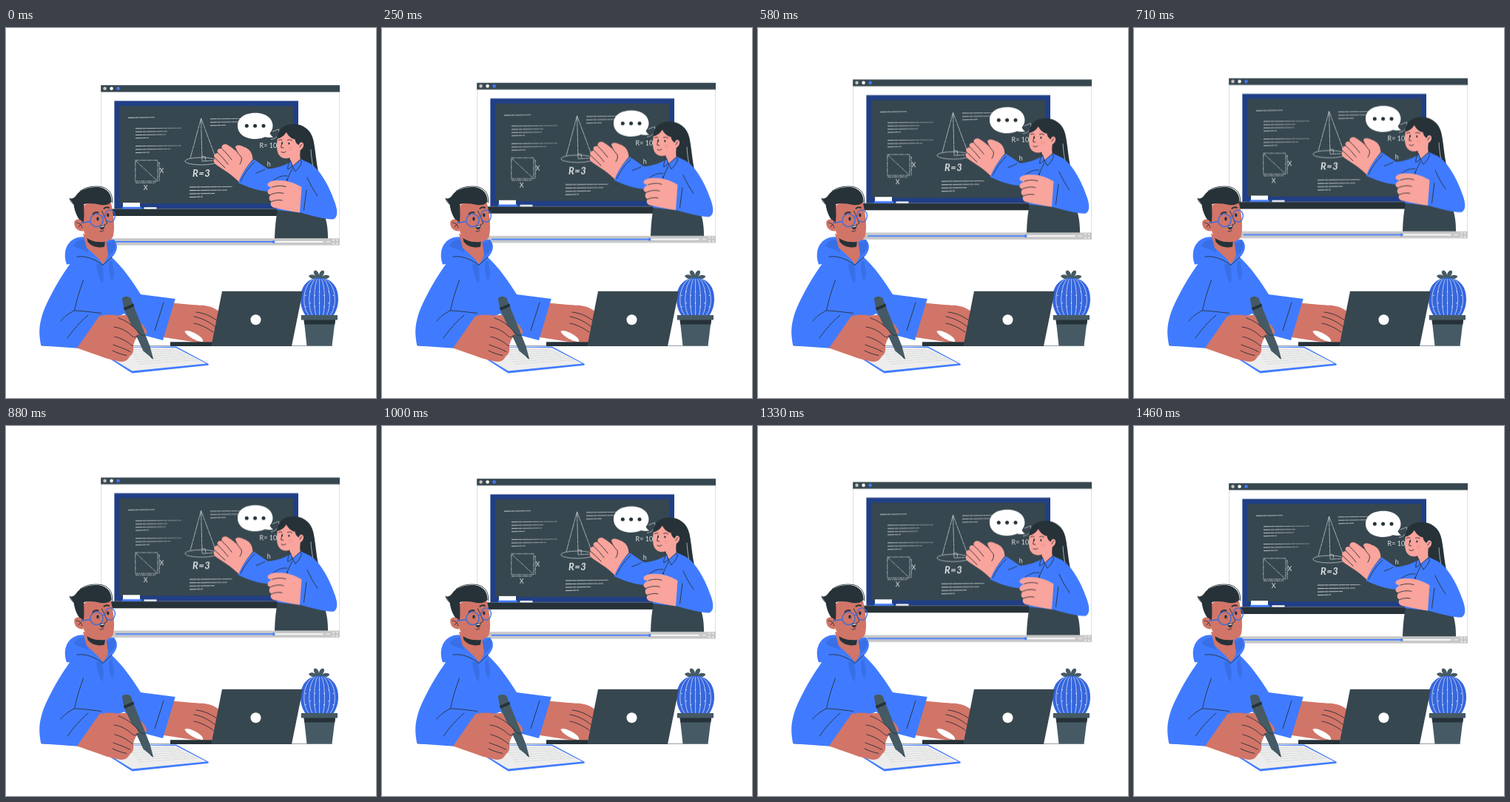
Animation of 500x500 px, one loop 1500 ms. Source, as an HTML page:

```html
<!DOCTYPE html>
<html lang="en">
<head>
<meta charset="utf-8">
<title>Online lesson</title>
<style>
html, body { margin: 0; width: 100%; height: 100%; overflow: hidden; background: #fff; }
svg { display: block; width: 100%; height: 100%; }
.blue { fill: #407bff; }
.navy { fill: #203f86; }
.shade { fill: #396fe6; }
.slate { fill: #37474f; }
.steel { fill: #455a64; }
.ink { fill: #263238; }
.pale { fill: #f9a49c; }
.tan { fill: #d17568; }
.grey { fill: #c7c7c7; }
.white { fill: #fff; }
.line { fill: none; stroke: #263238; stroke-width: .9; stroke-linecap: round; stroke-linejoin: round; }
.chalk { fill: none; stroke: #cbd1d4; stroke-width: .75; }
.rough { stroke-dasharray: 9 .5 5 .7 13 .4; }
.hand { fill: #dfe3e5; font: 9px Lato, "Open Sans", sans-serif; }
.big { font-size: 13px; font-weight: 700; font-style: italic; letter-spacing: .5px; }
</style>
</head>
<body>
<svg viewBox="0 0 500 500" xmlns="http://www.w3.org/2000/svg">
<defs>
  <linearGradient id="fade" gradientUnits="userSpaceOnUse" x1="165" x2="330" y1="0" y2="0">
    <stop offset="0" stop-color="#dfe3e5"/><stop offset=".42" stop-color="#7f8a8f"/>
    <stop offset=".5" stop-color="#dfe3e5"/><stop offset="1" stop-color="#9aa3a7"/>
  </linearGradient>
</defs>
<g id="screen">
  <!-- player -->
  <path d="M128.6 80V293H450.6V80Z" fill="#fff" stroke="#d0d0d0" stroke-width=".7"/>
  <path class="slate" d="M128.2 77.2H451V86.4H128.2Z"/>
  <circle class="grey" cx="133.6" cy="81.8" r="2.3"/>
  <circle class="white" cx="142.6" cy="81.8" r="2.3"/>
  <circle class="blue" cx="151.6" cy="81.8" r="2.3"/>
  <path class="grey" d="M128.2 284.2H451V293.5H128.2Z"/>
  <path class="white" d="M148 288H428.5V289.8H148Z"/>
  <path class="blue" d="M148 288H362V289.8H148Z"/>
  <circle class="blue" cx="361.6" cy="288.9" r="1.9"/>
  <path d="M432.5 288.9H438M442 288V286.3H444M446 286.3H447.8V288M447.8 290V291.7H446M444 291.7H442V290" fill="none" stroke="#fff" stroke-width=".9"/>

  <!-- board -->
  <path class="navy" d="M146.4 98.4H395V244.6H146.4Z"/>
  <path class="slate" d="M153.2 105.2H388.2V237.2H153.2Z"/>
  <path class="ink" d="M140 244.5H368V254H140Z"/>
  <path class="white" d="M158 236H181V242H158ZM186.5 242.2H203.5V244.4H186.5Z"/>
  <path class="blue" d="M157 241.8H183V244.4H157Z"/>
  <g id="notes" stroke="url(#fade)" stroke-width=".9"></g>
  <path class="chalk" d="M174.8 178.8H205V207H174.8ZM175 179.2L204.8 206.8M205.5 182H207.3V207M175 209.2H202" stroke-dasharray="5 .9 2 .6"/>
  <path class="chalk rough" d="M263.6 122L249 176M263.6 122L284 177M263.6 122L265 180M265 173.5L269.5 174V179.5M265 180L285 179"/>
  <ellipse class="chalk" cx="264" cy="180" rx="22" ry="5" stroke-width="1"/>
  <path class="chalk" d="M358 150.5C365 150 369 145 368.8 137M360 140L368.8 136.5" stroke-width=".6"/>
  <text class="hand big" x="252" y="201">R=3</text>
  <text class="hand" x="342.5" y="161.8" font-style="italic">R= 10</text>
  <text class="hand" x="352.8" y="187.3">h</text>
  <text class="hand" x="207.5" y="196.2">X</text>
  <text class="hand" x="185.8" y="219.2">X</text>

  <!-- speech bubble -->
  <path class="white" d="M313 132C313 121 323 114.7 337 114.7 351 114.7 360.5 122 360.5 132 360.5 136 359 139.5 356.5 142.3 357.5 144.5 359 146.3 361.3 147.6 357 148.5 353 148 349.8 147.3 346 149.2 341.5 150 337 150 323 150 313 143 313 132Z"/>
  <circle class="ink" cx="325.3" cy="132.2" r="2.5"/>
  <circle class="ink" cx="336.6" cy="132.2" r="2.5"/>
  <circle class="ink" cx="348" cy="132.2" r="2.5"/>

  <!-- teacher -->
  <path class="ink" d="M366.5 146C369 135 378 129.6 389 129.8 402 130 412.5 138 415.5 152 419 168 419 188 426 209L404 203 384 181Z"/>
  <path d="M412 164C413 180 415 191 420.5 204" fill="none" stroke="#fff" stroke-width=".6"/>
  <path class="slate" d="M368 240L407 240 430 252C434 262 435 273 435 284.2H363C363.3 270 365 254 368 240Z"/>
  <path class="blue" d="M385 180.5C376 186 366 189.5 354 190.5L335 177.5C326 186 318.5 197 313.5 209 328 215.5 344 222 361 221L366 246 398 249.5C421 256 436 259.5 443 258.2 449 255 448 246 444.5 236 437 214 425 192 411 183L398 177Z"/>
  <path class="pale" d="M383 172L398 163C397 171 397 176 398.5 178.5L391 190 384 180Z"/>
  <path class="pale" d="M368 144C365.5 154 365 165 368.5 171 372 177 381 178 388 173.5 392 171 395 168 396 165.5 400 165 403 160 402 156.5 400.5 153.3 397 154 394.5 157.5L392 149C386 149 381 146 379 141Z"/>
  <path class="ink" d="M366.3 149.5C366 142 371 135 379 133L390 138C399 143 399 154 395.5 158 391.5 156 391 152.5 390.5 150.5 385 149.5 380.5 145 379.5 139.5 376 146 371 149 366.3 149.5Z"/>
  <path class="line" d="M373.5 154C372.5 157 371.5 160 371.8 161.5L374.8 162M372 167.5C374 168.8 376.5 168.5 378 167.2M380.5 151.3Q383.5 149.6 386.5 152M368.5 151.6Q370.5 150 373 151.2M397 161Q398 157.5 400 157.2"/>
  <ellipse class="ink" cx="382.4" cy="156" rx="1.1" ry="1.6"/>
  <ellipse class="ink" cx="373" cy="155.8" rx="1" ry="1.5"/>
  <ellipse cx="384.5" cy="163" rx="3" ry="2.4" fill="#f28f8f" opacity=".4"/>
  <path class="line" style="fill:#407bff" d="M384.3 179.2C381.5 183.5 380.5 187 380.8 191L387.3 187 391 194C395 190 398 186 399.5 181.5L397.8 177.5 387.3 187Z"/>
  <path class="line" d="M387 190C383 198 380 204 379 209M317 207C322 197 328 188 336 181M350 191C346 193 342 195 338 196M407 202C411 211 416 220 421 227M402.5 246L406 219M361 206C368 201 374 199 380 200"/>
  <circle class="ink" cx="379.8" cy="204.8" r=".9"/>
  <path class="pale" d="M333.5 177.5C333 168 329 163 321 160.4 314 157 309 158.4 310 163 312 168 315 170 317.5 172.5 312 167 304 160 298.5 157.4 293.5 156 290 159.5 292 163.5 287.5 162 284 164.5 286.5 169 282 169 279.5 172.5 282.5 176 279.5 179 280.5 182.5 285 185.5L300 195.5C305 199 310 203.5 314.5 207.5 319 196 326 186 333.5 177.5Z"/>
  <path class="line" d="M310 162C312 168 315 171 318 174.5 319 178 318 181 316 184M292 163.5C297 168 301 173 305 178M286.5 169C292 174 296 179 300 184M282.5 176C287 180 292 185 296 189"/>
  <path class="pale" d="M399.5 215C391 210 382 206.3 370 206 361 205.5 354 207.5 353.5 211.5 353.5 215 358 215 360 215 355 217 352.5 220 354 223.5 355 225 357 225 358 225 354.5 228 355 233 359 234.5 356 238 358 243 365 243.3 376 246 387 248 397 249.5Z"/>
  <path class="line" d="M360 215C366 213 372 212.5 378 214.5M358 225C364 222.5 370 222 375 223.5M359 234.5C364 232.5 369 232 373 233"/>
</g>

<!-- desk -->
<path d="M49 429.4H441" stroke="#78868c" stroke-width=".8"/>

<!-- cactus -->
<path class="steel" d="M423 340C418 341 411 339 409 335 412 332 417 333 419 336 415 332 415 328 418 327.5 421 328 422.5 331 423 334 423.5 330 426 327 429.5 328 431 331 429 334 427 336 431 333 435 333 437.5 336 434 340 428 341 423 340Z"/>
<path d="M412 340C418 336.5 429 336.5 435 340 445 345 449 355 449 366 449 376 446 384 441 390H406C401 384 398 376 398 366 398 355 402 345 412 340Z" fill="#3566dc"/>
<g id="ribs" fill="none" stroke="#dde6fb" stroke-width=".75"></g>
<path class="steel" d="M402.5 393H445L440.5 429.5H406.5Z"/>
<path class="ink" d="M402.5 394H445.2L444.4 400.5H403.3Z"/>
<path class="steel" d="M398.8 388H448V394.6H398.8Z"/>

<!-- notebook -->
<path class="blue" d="M141 447.5L170.5 466.6 273.6 455.8 273.6 453.8 230 430.5 160 431Z"/>
<path fill="#ededed" d="M143.5 447L170.5 463.5 271 453.4 229.5 432 165 431.5Z"/>
<g id="script" stroke="#c3c8ca" stroke-width=".5" stroke-dasharray="7 1.2 3 1"></g>

<!-- right arm -->
<path class="tan" d="M224 371.5C239 373 254 374.5 266 374.8 276 375.8 284 379 289 384.5L285 412 279 424.5 262 425C248 424 232 420.5 213 418Z"/>
<path class="line" d="M257 384C268 385 278 390 286 396M254 390C266 392 276 398 284 405M254 399C264 401 273 406 280 411"/>
<path class="white" d="M241.5 410C244 407.5 252 410.5 258 414 264 417.5 267 421 266 424.5L258 422.5C251 419.5 243 414.5 241.5 410Z"/>
<path class="ink" d="M222 424.3H386V430H222Z"/>

<!-- laptop -->
<path class="slate" d="M292 355.7H401L386 430H277.4Z"/>
<circle class="white" cx="337.5" cy="394.3" r="7"/>

<!-- student -->
<path class="blue" d="M97 306C82 322 59 360 49.5 386 44.5 402 44 412 47.3 429.3L97 432.8 127 400 160 386 183.5 414.5 212 422 228.8 366 182 360C172 344 158 323 141 308Z"/>
<path class="blue" d="M82 319.5C77 306 80 292 91 285.5 99 281 107 282 112 284L146 286C152 293 151 301 144 309L131 321 100 318Z"/>
<path class="shade" d="M91 294C95 287 103 285 109 286L111 303C103 299 96 298 91 294ZM135 291L146 287C150 294 148 301 138 308Z"/>
<path class="shade" d="M122 318C122 329 126 339 131 346 132 337 132 329 130 320ZM143 314C146 327 147 336 144 341 140 338 139 329 139 319Z"/>
<path class="tan" d="M104 278L109 297C116 303 124 310 131 319 135 315 137 310 138 306L135 285Z"/>
<path class="ink" d="M109.5 284C117 289 126 290 134 288L133 295.5C124 298 115 295 110.5 289Z"/>
<path class="line" d="M96 309C109 307.5 121 313 131 320.5L143 309.5" stroke-width="1.3"/>
<path class="line" d="M104.5 341C99 356 95 369 92.5 382 102 382 116 384 128.5 385.5M92 382C84 386 78 391 74 396M83 419C91 408 101 396 111 388M213 371L201 409"/>

<!-- head -->
<path class="tan" d="M103 241C101 250 102 262 104.5 273 107 282 113 287 121 288.6 131 290.5 141 289 144.5 282 147.5 272 146 254 142 237L120 231Z"/>
<path class="ink" d="M104.5 264C98 260 93 250 91.5 238.5L86 230.5C90 231 92.5 229.5 95 226 99.5 219 110 215.3 121 215 134 214.6 143 222 142.5 235 139 239 134 240 128 239 119 237 111 236 105 238.5 105.5 249 106 257 104.5 264Z"/>
<path class="line" d="M100 220.5C107 215 117 213.3 127 214.3 138 215.5 145 224 143.5 236M86 230Q86.5 234.5 91 238" stroke-width=".6"/>
<path class="tan" d="M105 264C101 257 94 257 92.3 262 91.5 269 96 275 104.5 274.5Z"/>
<path class="line" d="M95 263C99 263 102 266 103 270M98 269L101 265.5"/>
<path d="M117.5 251.5Q120.5 247.8 124.5 249.5M132.5 243.8Q136 241.2 139 242.8" fill="none" stroke="#263238" stroke-width="2" stroke-linecap="round"/>
<ellipse class="ink" cx="124" cy="257.8" rx="1.7" ry="2.6"/>
<ellipse class="ink" cx="137.8" cy="252.8" rx="1.7" ry="2.6"/>
<path class="line" d="M129.5 247C132 253 135.5 260 136.7 264L132.5 266.5M127 275Q130 275.3 132 273.5"/>
<path class="ink" d="M126.5 267.3C129 267.8 131.5 267 133.5 265.8 133.8 269.8 131.8 272.5 129.3 272.3 127.4 271.6 126.5 269.5 126.5 267.3Z"/>
<path class="white" d="M127.5 268.1Q130.5 268.3 132.8 267L132.5 268.2Q130 269.4 127.7 269Z"/>
<g fill="none" stroke="#386cdf" stroke-width="1.3">
  <circle cx="122.5" cy="260" r="8.6"/>
  <ellipse cx="140.6" cy="254" rx="6.8" ry="8.2"/>
  <path d="M130.8 257Q132 254.5 133.9 255.5M114 261.5L101 263.5"/>
</g>

<!-- writing hand -->
<path class="tan" d="M96 432.5L126 389.5C135 387 143 387 151 388.5 161 387 171 388.5 177.5 394 183 399 188 404 190 409 191.5 414 187 417 179 415.5 174 421 172.5 426 172 431 173 437 171 441 167 444 164 450 159 452 152 450.5 141 448 133 446 126 443Z"/>
<path class="steel" d="M156.8 366C158 362.5 165 361.5 168.5 365L172 374 194.5 430 199.2 447.8 185.5 436.5 159.5 380Z"/>
<path class="ink" d="M158.8 378.2L172 372.4 173.4 376 160.5 381.8ZM196.3 443.5L199.2 447.8 195.2 444.7Z"/>
<path class="tan" d="M148 391C157 392 168 399 176 408L180 415 170 416C162 412 155 408 147 404Z"/>
<path class="line" d="M152 392C162 395 171 402 178 410 181 414 184 416.5 188 415.5M146 404C155 405 164 410 170 416 174 419 177 418 178 415M147 417C155 419 163 423 171.5 430M145 428C152 431 160 433 168 437.5M144 436C150 439 156 441 163 442.5"/>
</svg>
<script>
const add = (id, html) => { document.getElementById(id).innerHTML += html; };

// Chalk writing: left, right, y
const notes = [
  [165, 201, 121], [175, 237, 135.5], [175, 218, 140], [175, 216, 144.3], [175, 193, 148.6],
  [175, 237, 159.3], [175, 222, 163.8], [175, 194, 168.3],
  [276, 330, 122.6], [276, 316, 127.1], [276, 297, 131.6],
  [248, 306, 214.7], [248, 299, 219.3], [248, 282, 223.8], [248, 266, 228.3]
];
for (const [a, b, y] of notes)
  add('notes', `<path class="rough" d="M${a} ${y + .3}L${b} ${y - .3}"/>`);

// Cactus ribs bulge away from the middle
for (let i = -3; i <= 3; i++) {
  const x = 423.6 + i * 2.6, bulge = i * 6.8;
  add('ribs', `<path d="M${x} 339C${x + bulge * .75} 347 ${x + bulge * .85} 379 ${x + i * 1.6} 390"/>`);
  for (let k = 1; k < 3; k++) {
    const u = k / 3;
    add('ribs', `<circle cx="${x + bulge * 2.4 * u * (1 - u)}" cy="${341 + 46 * u + (i & 1) * 5}" r=".7" fill="#fff" stroke="none"/>`);
  }
}

for (let i = 0; i < 7; i++)
  add('script', `<path d="M${166 + i * 2.2} ${435 + i * 3.2}l${62 + i * 3} ${-1 - i * .8}"/>`);

document.getElementById('screen').animate([
  { transform: 'translateY(0)', offset: 0 },
  { transform: 'translateY(-9.8px)', offset: .486 },
  { transform: 'translateY(0)', offset: .972 },
  { transform: 'translateY(0)', offset: 1 }
], { duration: 1500, iterations: Infinity });
</script>
</body>
</html>
```
